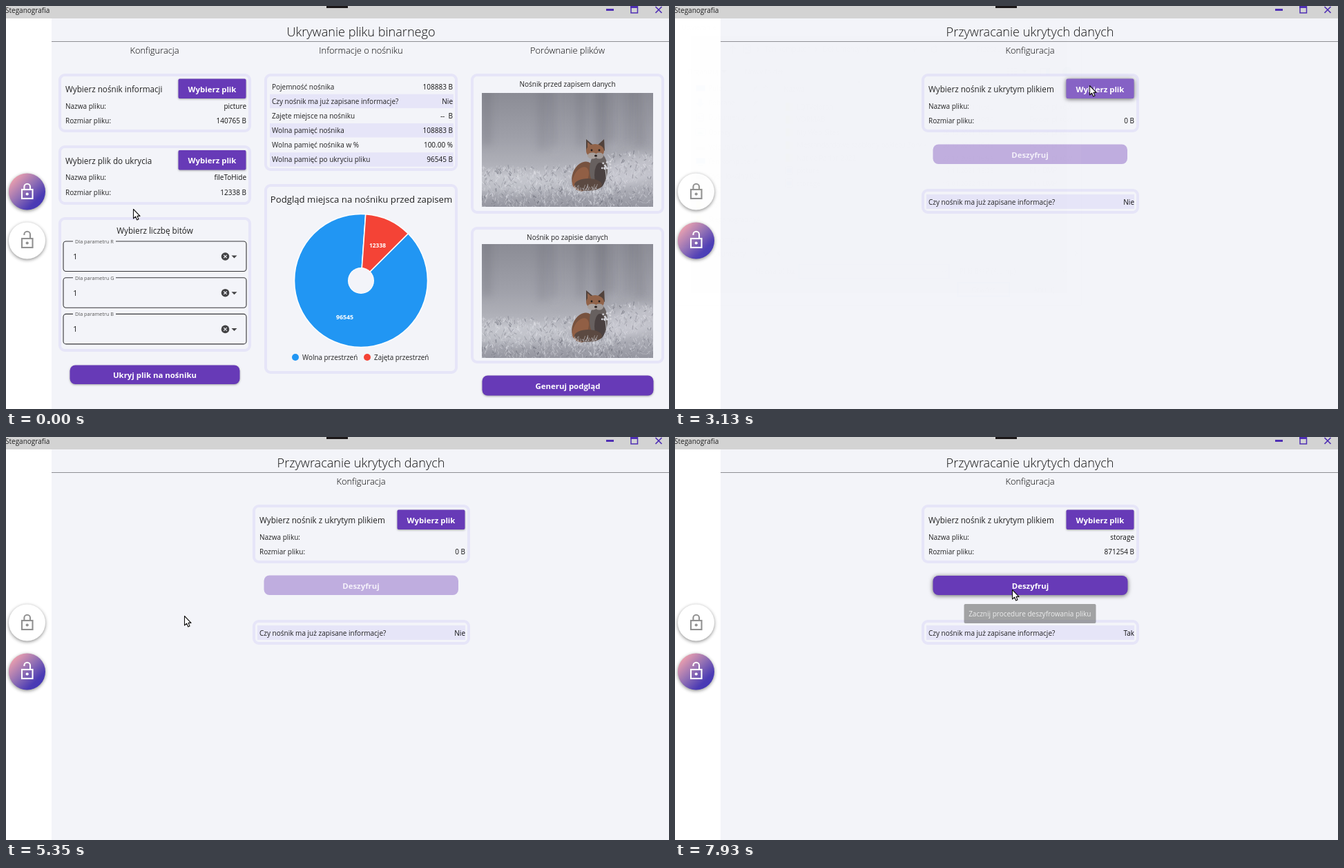
Recreate the animation shown at these times as an HTML page with a canvas. Size 960 by 584 pixels, loop 8 s.

```html
<!DOCTYPE html>
<html lang="pl">
<head>
<meta charset="utf-8">
<title>Steganografia</title>
<style>
html, body { margin: 0; width: 100%; height: 100%; overflow: hidden; background: #f3f4f9; }
canvas { display: block; }
</style>
</head>
<body>
<canvas id="stage" width="960" height="584"></canvas>
<script>
const stage = document.getElementById('stage');
let c = stage.getContext('2d');
const LOOP = 8000, BG = '#f3f4f9', PURPLE = '#673ab7', LILAC = '#e6e5f8';
const FONT = '"Open Sans", "Noto Sans", sans-serif';
const clamp = v => Math.max(0, Math.min(1, v));
const ramp = (t, a, b) => clamp((t - a) / (b - a));

// ---------- drawing helpers ----------
function text(s, x, y, size = 10, color = '#222', align = 'left', weight = 400) {
  c.font = `${weight} ${size}px ${FONT}`;
  c.textAlign = align;
  c.fillStyle = color;
  c.fillText(s, x, y);
}
function rect(x, y, x2, y2, fill) {
  c.fillStyle = fill;
  c.fillRect(x, y, x2 - x, y2 - y);
}
function box(x, y, x2, y2, r, fill, stroke, width = 1) {
  c.beginPath();
  c.roundRect(x, y, x2 - x, y2 - y, r);
  if (fill) { c.fillStyle = fill; c.fill(); }
  if (stroke) { c.strokeStyle = stroke; c.lineWidth = width; c.stroke(); }
}
function line(color, width, ...p) {
  c.beginPath();
  for (let i = 0; i < p.length; i += 2) c.lineTo(p[i], p[i + 1]);
  c.strokeStyle = color;
  c.lineWidth = width;
  c.stroke();
}
function shape(fill, ...p) {
  c.beginPath();
  for (let i = 0; i < p.length; i += 2) c.lineTo(p[i], p[i + 1]);
  c.closePath();
  c.fillStyle = fill;
  c.fill();
}
function dot(x, y, r, fill, ry = r, turn = 0) {
  c.beginPath();
  c.ellipse(x, y, r, ry, turn, 0, 7);
  c.fillStyle = fill;
  c.fill();
}
function withShadow(blur, dy, alpha, draw) {
  c.save();
  c.shadowColor = `rgba(0,0,0,${alpha})`;
  c.shadowBlur = blur;
  c.shadowOffsetY = dy;
  draw();
  c.restore();
}
function faded(alpha, draw) {
  if (alpha <= 0) return;
  c.save();
  c.globalAlpha = alpha;
  draw();
  c.restore();
}
const card = (x, y, x2, y2) => box(x + 2, y + 2, x2 - 2, y2 - 2, 7, null, LILAC, 4);
const heading = (s, x) => text(s, x, 68.5, 12.9, '#000', 'center', 300);

function button(s, x, y, x2, y2, r, { fill = PURPLE, lift = 0, glow = 0 } = {}) {
  withShadow(3 + 3 * lift, 1, 0.35 + 0.25 * lift, () => box(x + .5, y + .5, x2 + .5, y2, r, fill));
  if (glow) faded(glow, () => box(x + .5, y + .5, x2 + .5, y2, r, '#fff'));
  text(s, (x + x2) / 2 + .5, (y + y2) / 2 + 5.3, 11.4, '#fff', 'center', 700);
}
function tooltip(s, x, x2, y, alpha) {
  faded(alpha, () => {
    box(x, y, x2, y + 28, 2, 'rgba(112,112,112,.78)');
    text(s, x2 - 7, y + 18, 10, '#fff', 'right');
  });
}

// ---------- photo ----------
const photo = document.createElement('canvas');
photo.width = 248;
photo.height = 165;
function paintPhoto() {
  let seed = 7;
  const rnd = () => (seed = seed * 16807 % 2147483647) / 2147483647;
  const main = c;
  c = photo.getContext('2d');
  const sky = c.createLinearGradient(0, 0, 0, 165);
  [[0, '#8b8c95'], [.4, '#9fa0a9'], [.6, '#adaeb6'], [.74, '#bcbdc5'], [.86, '#a9aab3'], [1, '#94959f']]
    .forEach(([p, col]) => sky.addColorStop(p, col));
  rect(0, 0, 248, 165, sky);
  c.filter = 'blur(6px)';
  for (let i = 0; i < 16; i++) {
    const x = rnd() * 248, w = 4 + rnd() * 10;
    rect(x, -9, x + w, 70 + rnd() * 20, rnd() < .5 ? 'rgba(85,87,97,.2)' : 'rgba(190,191,199,.2)');
  }
  // frosted banks behind the fox
  dot(215, 112, 45, 'rgba(205,206,213,.6)', 20, -.25);
  dot(50, 130, 75, 'rgba(208,209,216,.5)', 15);
  c.filter = 'none';
  for (let i = 0; i < 1300; i++) {
    const x = rnd() * 248, edge = x > 185 ? 88 : 108, y = edge + rnd() * (168 - edge);
    const shade = rnd() < .3 ? '88,90,102' : '232,233,239';
    line(`rgba(${shade},${.15 + .35 * rnd()})`, .6 + .7 * rnd(),
      x, y, x + rnd() * 8 - 4, y - 1 - 5 * rnd());
  }
  c.filter = 'blur(.7px)';
  dot(147, 121, 16, '#77523f', 22, .35);
  dot(143, 123, 10, '#915f45', 17, .5);
  dot(169, 111, 13, '#67605f', 25);
  dot(171, 119, 8, '#4a4141', 18);
  dot(154, 133, 20, '#5b4941', 9);
  shape('#51423b', 151, 84, 151, 67, 163, 77);
  shape('#51423b', 167, 76, 177, 67, 178, 84);
  shape('#93664e', 153, 82, 153, 71, 161, 78);
  dot(164, 84, 13, '#916349', 10);
  dot(160, 91, 7, '#a8a09d', 4.5);
  dot(170, 91, 6, '#a19a98', 4.5);
  dot(159, 83, 1.4, '#221c1a');
  dot(170, 83, 1.4, '#221c1a');
  dot(165, 91, 2, '#241d1b', 1.6);
  c.filter = 'none';
  for (let i = 0; i < 150; i++) {
    const x = 118 + rnd() * 74, y = 137 + rnd() * 12;
    line('rgba(215,216,223,.55)', .9, x, y, x + rnd() * 6 - 3, y - 7 * rnd());
  }
  line('#d9d9df', .8, 183, 145, 180, 119, 178, 104);
  for (let i = 0; i < 12; i++) dot(173 + rnd() * 14, 96 + rnd() * 14, 1.4, '#d6d6dc');
  c = main;
}

// ---------- window frame ----------
function lock(y, open, color) {
  c.strokeStyle = color;
  c.lineWidth = 2.1;
  c.strokeRect(23, y - 3, 15.5, 13);
  c.beginPath();
  c.moveTo(35, y - 3);
  c.lineTo(35, y - 7 - open);
  c.arc(30.7, y - 7 - open, 4.3, 0, Math.PI, true);
  c.lineTo(26.4, open ? y - 8 : y - 3);
  c.stroke();
  dot(30.7, y + 3.5, 2.1, color);
}
function circle(y, open, active, lift) {
  let fill = '#fff';
  if (active) {
    fill = c.createLinearGradient(12, y - 19, 49, y + 19);
    fill.addColorStop(0, '#e79dae');
    fill.addColorStop(.45, '#9270b4');
    fill.addColorStop(.85, '#4b3bb4');
    fill.addColorStop(1, '#4638b6');
  }
  withShadow(5 + 3 * lift, 1.5, .45 + .25 * lift, () => dot(30.5, y, 26.5, fill));
  lock(y, open, active ? '#fff' : '#919191');
}
function chrome(title, second, lift) {
  rect(0, 0, 960, 584, BG);
  rect(0, 18, 66, 584, '#fff');
  rect(0, 0, 960, 18, '#d3d3d3');
  rect(464, 0, 495, 3, '#1b1718');
  text('Steganografia', -1, 10, 10);
  const ink = '#4f2fb4';
  rect(869, 4, 880, 7, ink);
  line(ink, 1.5, 905, 1, 914.5, 1, 914.5, 10, 905, 10, 905, 0);
  rect(904, 0, 915, 3, ink);
  line(ink, 1.7, 940.5, 1, 949.5, 10);
  line(ink, 1.7, 949.5, 1, 940.5, 10);
  rect(66, 51, 960, 52, '#8e8e94');
  text(title, 514, 44, 18.1, '#111', 'center', 300);
  circle(269, 0, !second, 0);
  circle(340, 2, second, lift);
}
function fileInfo(x, right, y, label, name, size, look) {
  text(label, x, y, 11.7);
  text('Nazwa pliku:', x, y + 23.5);
  text('Rozmiar pliku:', x, y + 45);
  text(name, right, y + 23.5, 10, '#111', 'right');
  text(size, right, y + 45, 10, '#111', 'right');
  button('Wybierz plik', right - 99, y - 20, right - 1, y + 9, 2, look);
}

// ---------- hiding screen ----------
function field(y, letter) {
  box(83, y, 348, y + 43.5, 4, null, '#37373a', 1.1);
  rect(97, y - 2, 159, y + 2, BG);
  text('Dla parametru ' + letter, 100, y + 3, 7.3, '#555');
  text('1', 97, y + 26, 11.5);
  dot(317.5, y + 22, 5.8, '#434345');
  line(BG, 1.2, 315.3, y + 19.8, 319.7, y + 24.2);
  line(BG, 1.2, 319.7, y + 19.8, 315.3, y + 24.2);
  shape('#434345', 326.5, y + 20.5, 334.5, y + 20.5, 330.5, y + 24.5);
}
function slice(a, b, fill) {
  const rad = d => (d - 90) * Math.PI / 180;
  c.beginPath();
  c.moveTo(514, 398);
  c.arc(514, 398, 96.5, rad(a), rad(b));
  c.closePath();
  c.fillStyle = fill;
  c.fill();
  c.strokeStyle = '#fff';
  c.lineWidth = 1.6;
  c.stroke();
}
function hideScreen(t) {
  chrome('Ukrywanie pliku binarnego', false, ramp(t, 900, 1100));
  ['Konfiguracja', 'Informacje o nośniku', 'Porównanie plików'].forEach((s, i) => heading(s, 215 + 299 * i));
  [[76, 98, 355, 183], [76, 202, 355, 288], [76, 306, 355, 501], [374, 98, 654, 239],
   [374, 258, 654, 533], [673, 98, 953, 301], [673, 320, 953, 518]].forEach(b => card(...b));

  fileInfo(86, 348, 125, 'Wybierz nośnik informacji', 'picture', '140765 B');
  fileInfo(86, 348, 228.5, 'Wybierz plik do ukrycia', 'fileToHide', '12338 B');
  text('Wybierz liczbę bitów', 215.5, 330, 11.7, '#222', 'center');
  ['R', 'G', 'B'].forEach((s, i) => field(341 + 52.7 * i, s));
  button('Ukryj plik na nośniku', 92, 520, 338, 548, 8);

  [['Pojemność nośnika', '108883 B'], ['Czy nośnik ma już zapisane informacje?', 'Nie'],
   ['Zajęte miejsce na nośniku', '--  B'], ['Wolna pamięć nośnika', '108883 B'],
   ['Wolna pamięć nośnika w %', '100.00 %'], ['Wolna pamięć po ukryciu pliku', '96545 B']
  ].forEach(([label, value], i) => {
    const y = 120.5 + 21.15 * i;
    if (i % 2) rect(382, y - 14, 648, y + 6.5, LILAC);
    text(label, 385, y);
    text(value, 647, y, 10, '#111', 'right');
  });

  text('Podgląd miejsca na nośniku przed zapisem', 514.5, 285, 13.2, '#222', 'center');
  slice(45, 364, '#2196f3');
  slice(4, 45, '#f44336');
  dot(514, 398, 19, '#fff');
  dot(514, 398, 18, BG);
  text('12338', 538, 350, 8.4, '#fff', 'center', 700);
  text('96545', 490.5, 454, 8.8, '#fff', 'center', 700);
  dot(419, 509, 5, '#2196f3');
  text('Wolna przestrzeń', 429, 513, 9.9);
  dot(523, 509, 5, '#f44336');
  text('Zajęta przestrzeń', 533, 513, 9.9);

  text('Nośnik przed zapisem danych', 813, 117, 10, '#222', 'center');
  text('Nośnik po zapisie danych', 813, 339, 10, '#222', 'center');
  c.drawImage(photo, 689, 126);
  c.drawImage(photo, 689, 345);
  button('Generuj podgląd', 689, 535, 937, 564.5, 8);
  tooltip('Wyodrębnij plik binarny z pliku BMP', -55, 116, 379, ramp(t, 1110, 1235));
}

// ---------- restoring screen ----------
function restoreScreen(t) {
  const loaded = t >= 5480;
  chrome('Przywracanie ukrytych danych', true, 1 - ramp(t, 2800, 3000));
  heading('Konfiguracja', 514);
  card(357, 98, 672, 183);
  card(357, 265, 672, 301);
  const glow = .27 * ramp(t, 2950, 3200) * (1 - ramp(t, 3520, 3850));
  const lift = t > 5400 ? 1 - ramp(t, 7050, 7250) : ramp(t, 2250, 2450) * (1 - ramp(t, 3600, 3850));
  fileInfo(367, 665, 125, 'Wybierz nośnik z ukrytym plikiem',
    loaded ? 'storage' : '', loaded ? '871254 B' : '0 B', { lift, glow });
  if (loaded) {
    button('Deszyfruj', 373, 200.5, 655, 229, 8, { lift: ramp(t, 6750, 6950) });
  } else {
    box(373.5, 200.5, 655, 229, 8, '#bfaddf');
    text('Deszyfruj', 514, 220, 11.4, '#f4f0fa', 'center', 700);
  }
  rect(364, 273, 665, 294, LILAC);
  text('Czy nośnik ma już zapisane informacje?', 367, 287.5);
  text(loaded ? 'Tak' : 'Nie', 665, 287.5, 10, '#111', 'right');
  tooltip('Wybierz plik z ukrytymi danymi', 532, 698, 147, .9 * ramp(t, 2640, 2760) * (1 - ramp(t, 2900, 2970)));
  tooltip('Zacznij procedure deszyfrowania pliku', 418.5, 609.5, 242, .8 * ramp(t, 7240, 7400));
}

// ---------- file dialog ----------
function folder(x, y) {
  rect(x, y - 6, x + 6, y + 6, '#e8b94a');
  rect(x, y - 4.5, x + 11, y + 6.5, '#fbdc81');
}
function sheet(x, y) {
  box(x + .5, y - 6, x + 10.5, y + 6, 1, '#fff', '#7590a8');
  rect(x + 2, y - 2, x + 5, y + 1, '#2c7dc0');
  for (let i = 0; i < 4; i++) rect(x + (i < 2 ? 6 : 2), y - 4 + 2.4 * i, x + 9, y - 3 + 2.4 * i, '#6a95b8');
}
function picture(x, y) {
  box(x + .5, y - 6, x + 10.5, y + 6, 1, '#fff', '#8b98a5');
  rect(x + 2, y - 3, x + 9, y + 3.5, '#2d72b5');
  dot(x + 6, y + 2, 2, '#dcecf8', 1.2);
}
function screen(x, y) {
  rect(x - 1, y - 5, x + 13, y + 4, '#1c6fb5');
  rect(x, y - 4, x + 12, y + 3, '#35a2ec');
}
function pc(x, y) {
  screen(x, y);
  rect(x + 2, y + 5, x + 10, y + 6.5, '#4d6373');
}
function drive(x, y) {
  box(x, y, x + 12, y + 5, 1, '#4a4f54');
  rect(x + 8, y + 2, x + 10, y + 3, '#6fe08d');
}
function systemDrive(x, y) {
  drive(x, y);
  rect(x, y - 6, x + 6, y - 1, '#29a0e6');
}
function download(x, y) {
  shape('#2086d8', x + 3, y - 6, x + 8, y - 6, x + 8, y, x + 12, y, x + 5.5, y + 6, x - 1, y, x + 3, y);
}
function gallery(x, y) {
  box(x - 1, y - 5, x + 13, y + 5, 0, '#fff', '#8ba0b0');
  rect(x + 1, y - 3, x + 11, y + 3, '#69b5e5');
  shape('#3d6d8c', x + 1, y + 3, x + 5, y - 1, x + 11, y + 3);
}
function chevron(x, y, dx, dy, color = '#555', w = 1.2) {
  line(color, w, x - dx - 3 * !dx, y - dy - 3 * !dy, x + dx, y + dy, x - dx + 3 * !dx, y - dy + 3 * !dy);
}
function arrow(x, y, dir, color) {
  line(color, 1.4, x - 5, y, x + 5, y);
  line(color, 1.4, x + dir, y - 4, x + 5 * dir, y, x + dir, y + 4);
}

const NAV = [['Pulpit', screen], ['Pobrane', download], ['Dokumenty', sheet], ['Obrazy', gallery],
  ['Velqua Drive', drive], ['Ten kompute', pc], ['Dysk lokalny (C:)', systemDrive],
  ['lab3', folder], ['lab11', folder], ['SteganographyApp', folder]];
const FILES = [['LQTVeloran', '26.12.2021 10:45'], ['VORMAB', '06.01.2022 19:30'],
  ['My Web Sites', '26.12.2021 10:45'], ['Niestandardowe szablony pakietu Zorvik', '30.12.2021 19:45'],
  ['Native Parlor 2022', '27.12.2021 16:52'], ['picture', '11.11.2021 15:28'], ['storage', '11.01.2022 15:19']];

function dialog(t, pointer) {
  withShadow(18, 4, .5, () => rect(1, 18, 589, 434, '#fff'));
  box(1.5, 18.5, 588.5, 433.5, 0, '#fff', '#777b80');
  text('Otwieranie', 9, 35, 10, '#111');
  line('#222', 1.1, 570.5, 26.5, 579.5, 35.5);
  line('#222', 1.1, 579.5, 26.5, 570.5, 35.5);

  arrow(19, 63, -1, '#cfcfcf');
  arrow(45, 63, 1, '#cfcfcf');
  chevron(66, 63, 0, 1.5, '#c8c8c8');
  line('#555', 1.5, 83.5, 69, 83.5, 58);
  line('#555', 1.5, 79, 62.5, 83.5, 58, 88, 62.5);
  box(95.5, 50.5, 389.5, 75.5, 0, '#fff', '#d9d9d9');
  rect(360, 51, 361, 75, '#d9d9d9');
  sheet(99, 62);
  [120, 204, 279].forEach(x => chevron(x, 63, 1.2, 0, '#444'));
  text('Ten komputer', 130, 66, 10, '#111');
  text('Dokumenty', 214, 66, 10, '#111');
  chevron(347, 63, 0, 2, '#555', 1.6);
  c.beginPath();
  c.arc(375, 63, 4, -.3, 5.2);
  c.strokeStyle = '#666';
  c.lineWidth = 1.3;
  c.stroke();
  shape('#666', 376, 57, 380, 58, 378, 62);
  box(400.5, 50.5, 577.5, 75.5, 0, '#fff', '#d9d9d9');
  c.beginPath();
  c.arc(420, 61, 3.5, 0, 7);
  c.stroke();
  line('#777', 1.3, 417.5, 63.5, 414, 67);
  text('Przeszukaj: Dokumenty', 436, 66, 10, '#6d6d6d');

  rect(2, 82, 588, 109, '#f5f6f7');
  text('Organizuj', 18, 99, 10, '#1e395b');
  shape('#222', 67, 93, 75, 93, 71, 97.5);
  text('Nowy folder', 101, 99, 10, '#1e395b');
  for (let i = 0; i < 3; i++) {
    rect(481, 90 + 4 * i, 484, 92 + 4 * i, '#777');
    rect(486, 90 + 4 * i, 489, 92 + 4 * i, '#777');
    rect(491, 90 + 4 * i, 495, 92 + 4 * i, '#777');
  }
  shape('#222', 503, 93, 510, 93, 506.5, 97);
  box(529.5, 90.5, 542.5, 100.5, 0, '#fff', '#5a7d99');
  rect(537, 91, 542, 100, '#3f9ae0');
  dot(568, 95, 7, '#0b63b5');
  text('?', 568, 99, 10.5, '#fff', 'center', 700);

  // navigation pane
  c.save();
  c.beginPath();
  c.rect(2, 109, 122, 258);
  c.clip();
  rect(2, 348, 124, 367, '#d9d9d9');
  NAV.forEach(([name, icon], i) => {
    const y = 119.5 + 21.1 * i;
    icon(31, y);
    text(name, 48, y + 3.7, 10, '#111');
    if (i < 6) {
      line('#7f8a94', 1.2, 113, y + 4, 116, y + 1);
      line('#7f8a94', 3, 115, y + 1, 119, y - 3);
    }
  });
  pc(24, 337);
  text('Ten komputer', 41, 341.5, 10, '#111');
  sheet(31, 358.5);
  text('Dokumenty', 48, 362.5, 10, '#111');
  c.restore();
  rect(125, 109, 138, 367, '#f0f0f0');
  rect(125, 137, 138, 252, '#cdcdcd');
  chevron(131.5, 117.5, 0, -1.8, '#444', 1.6);
  chevron(131.5, 359, 0, 1.8, '#444', 1.6);

  // file list
  [['Nazwa', 157], ['Data modyfikacji', 387], ['Typ', 514]].forEach(([s, x]) => text(s, x, 124, 10, '#4c607a'));
  rect(381, 109, 382, 132, '#e5e5e5');
  rect(507, 109, 508, 132, '#e5e5e5');
  chevron(266.5, 111, 0, -1.5, '#777', 1);
  FILES.forEach(([name, date], i) => {
    const y = 145.7 + 18.5 * i, isFile = i > 4;
    if (t > 5110 && i === 6) rect(155, y - 9.5, 588, y + 9.5, '#cce8ff');
    else if (pointer.x < 585 && Math.abs(pointer.y - y) < 9.25) rect(155, y - 9.5, 588, y + 9.5, '#e5f3ff');
    (isFile ? picture : folder)(160, y);
    text(name, 176, y + 3.8, 10, '#111');
    text(date, 387, y + 3.8, 9.4, '#6d6d6d');
    text(isFile ? 'Plik BMP' : 'Folder plików', 513, y + 3.8, 10, '#6d6d6d');
  });
  rect(142, 351, 588, 366, '#f0f0f0');
  rect(157, 352, 494, 365, '#cdcdcd');
  chevron(150, 358.5, -1.8, 0, '#444', 1.6);
  chevron(580.5, 358.5, 1.8, 0, '#444', 1.6);

  // bottom bar
  rect(2, 367, 588, 433, '#f0f0f0');
  text('Nazwa pliku:', 175, 388, 10, '#111', 'right');
  box(179.5, 374.5, 397, 394.5, 0, '#fff', '#1878c8', 1.2);
  chevron(389.5, 385, 0, 1.7);
  if (t > 5110) text('storage', 183, 388, 10, '#111');
  else if (Math.floor((t - 3200) / 530) % 2 === 0) rect(183, 378, 184, 391, '#000');
  box(408.5, 374.5, 572.5, 393.5, 0, '#e3e3e3', '#adadad');
  text('Pliki BMP (*.bmp)', 412, 388, 10, '#111');
  chevron(565, 385, 0, 1.7);
  box(409.5, 401, 484, 420.5, 0, '#e1e1e1', '#0f78d4', 2);
  text('Otwórz', 446.5, 414.5, 10, '#111', 'center');
  box(497, 401, 572, 420.5, 0, '#e1e1e1', '#adadad');
  text('Anuluj', 534, 414.5, 10, '#111', 'center');
  for (let i = 0; i < 3; i++)
    for (let j = 0; j <= i; j++) rect(585 - 3 * j, 424 + 3 * i, 587 - 3 * j, 426 + 3 * i, '#bfbfbf');
}

// ---------- pointer ----------
const PATH = [[0, 184, 294], [250, 184, 294], [1030, 33, 338], [1620, 33, 338], [2210, 573, 140],
  [2500, 600, 115], [3130, 600, 115], [3450, 593, 124], [4040, 593, 124], [4460, 314, 252],
  [4740, 264, 259], [4860, 264, 259], [4940, 258, 259], [5940, 258, 259], [6020, 261, 259],
  [6200, 261, 259], [6950, 482, 225], [7929, 482, 225], [7930, 488, 221], [LOOP, 488, 221]];
function pointerAt(t) {
  const i = PATH.findIndex(p => p[0] > t), [a, x, y] = PATH[i - 1], [b, x2, y2] = PATH[i];
  const u = ramp(t, a, b), e = u * u * (3 - 2 * u);
  return { x: Math.round(x + (x2 - x) * e), y: Math.round(y + (y2 - y) * e) };
}
function drawPointer({ x, y }, dialogOpen) {
  c.save();
  c.translate(x, y);
  c.lineJoin = 'round';
  c.strokeStyle = '#111';
  c.fillStyle = '#fff';
  c.lineWidth = 1.1;
  const overCircle = [269, 340].some(cy => Math.hypot(x - 30.5, y - cy) < 27);
  let d = 'M.5 .5V14L3.6 11.2 5.7 16 8 15 6 10.4H10Z';
  if (overCircle) d = 'M1 2Q1 .5 2.3 .5T3.6 2V8Q5 6.2 6.3 8.3 7.6 6.7 8.9 9 10.8 7.8 11.7 10V15Q11.7 18 9.5 20.5H3.5Q1.5 17-1.7 13.3-2.6 10.8-.6 11.2L1 13Z';
  else if (dialogOpen && x > 585 && x < 600) d = 'M-8.5 0L-4-4V-1.5H4V-4L8.5 0 4 4V1.5H-4V4Z';
  const outline = new Path2D(d);
  c.fill(outline);
  c.stroke(outline);
  c.restore();
}

// ---------- timeline ----------
function frame(now) {
  const t = now % LOOP, pointer = pointerAt(t);
  const shown = ramp(t, 3130, 3280) * (1 - ramp(t, 5200, 5340));
  if (t < 1590) hideScreen(t);
  else restoreScreen(t);
  faded(shown, () => dialog(t, pointer));
  drawPointer(pointer, shown > 0);
  requestAnimationFrame(frame);
}
paintPhoto();
requestAnimationFrame(frame);
</script>
</body>
</html>
```
